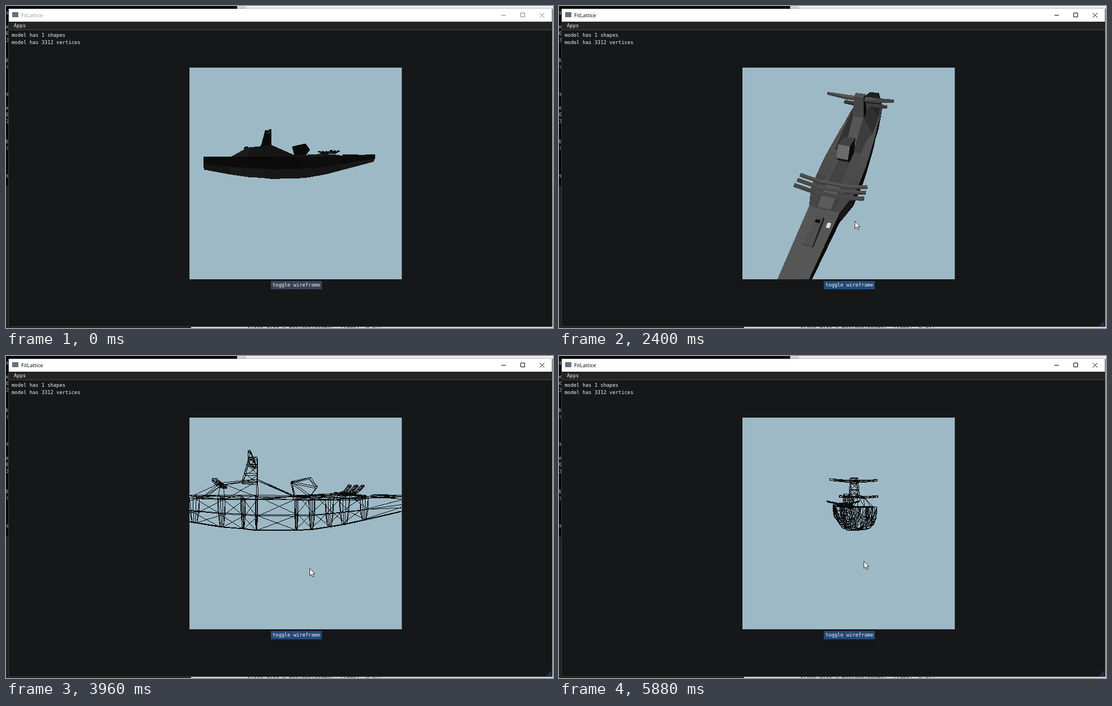
An HTML page with a canvas that plays this animation: 975x575 px, repeating every 6000 ms.

```html
<!DOCTYPE html>
<html lang="en">
<head>
<meta charset="utf-8">
<title>Model viewer</title>
<style>
  html, body { margin: 0; width: 100%; height: 100%; overflow: hidden; background: #fff; }
  #stage { position: absolute; left: 0; top: 0; width: 975px; height: 575px; overflow: hidden; background: #f4f5f5; }
  #stage * { position: absolute; box-sizing: border-box; white-space: pre; }
  .mono { font: 8.86px/13px "DejaVu Sans Mono", "Noto Sans Mono", monospace; color: #f4f4f4; }
  #console { left: 0; top: 0; width: 412px; height: 321px; background: #080808; }
  #side { left: 0; top: 321px; width: 330px; height: 254px; background: #232527; }
  #tab { left: 412px; top: 0; width: 16px; height: 8px; background: #d5d7d8; }
  #code { left: 430px; top: 568px; color: #444; font-size: 9.5px; }
  #win { left: 4px; top: 5px; width: 970px; height: 568px; background: #151718; border: 1px solid #3a3c3e; border-top: 0; box-shadow: 0 0 4px rgba(0, 0, 0, .4); }
  #bar { left: 0; top: 0; width: 968px; height: 23px; background: #fff; }
  #icon { left: 6px; top: 6px; width: 11px; height: 9px; background: #66717c; }
  #name { left: 22px; top: 5px; font: 9.3px/13px "Open Sans", "Noto Sans", sans-serif; color: #000; }
  #menu { left: 0; top: 23px; width: 968px; height: 15px; background: #242424; border-bottom: 1px solid #46474b; }
  #btns { left: 870px; top: 0; }
  #view { left: 327px; top: 110px; border-right: 1px solid #5a676e; }
  #toggle { left: 472px; top: 491px; width: 91px; height: 15px; line-height: 15px; padding-left: 3px; background: #244a78; }
  #grip { left: 957px; top: 557px; border: 5px solid #1c3350; border-left-color: transparent; border-top-color: transparent; }
  .idle #name { color: #999; }
  .idle #btns { opacity: .5; }
  .idle #toggle { background: #3c4256; }
  .idle #pointer, .idle #grip { display: none; }
  .hover #toggle { background: #4296fa; }
</style>
</head>
<body>
<div id="stage" class="idle">
  <div id="console"></div>
  <div id="side"></div>
  <div id="tab"></div>
  <div id="code" class="mono">float diff = max(dot(normal, light), 0.0);</div>
  <div id="win">
    <div id="bar">
      <div id="icon"></div>
      <div id="name">FitLattice</div>
      <svg id="btns" width="98" height="23" fill="none" stroke="#000">
        <path d="M8 11.5h8M42.500 7.500h7v7h-7zM76.500 7.500l8 8m0-8l-8 8"/>
      </svg>
    </div>
    <div id="menu"><span class="mono" style="left:9px;top:1px">Apps</span></div>
    <div class="mono" style="left:5px;top:41px">model has 1 shapes</div>
    <div class="mono" style="left:5px;top:54px">model has 3312 vertices</div>
    <div id="grip"></div>
  </div>
  <canvas id="view" width="378" height="378"></canvas>
  <div id="toggle" class="mono">toggle wireframe</div>
  <svg id="pointer" width="14" height="20" style="left:0;top:0">
    <path d="M.5 .5v13l3-2.800 2 4.700 2.200-.9-2-4.600h4z" fill="#fff" stroke="#000" stroke-width=".8"/>
  </svg>
</div>
<script>
const $ = id => document.getElementById(id);
const stage = $('stage'), pointer = $('pointer');
const SIZE = 378, MID = SIZE / 2, FOCAL = 456, LOOP = 6000, STEP = 120;
const WIRE_FROM = 3240;

// Clipped console column behind the window
[[12, 's'], [37, 'e'], [49, '0'], [61, '3'], [97, 'b'], [109, 't'],
 [157, 's'], [182, 'e'], [194, '0'], [206, '3'], [242, 'b'], [254, 't'], [303, 's']]
  .forEach(([y, ch]) => {
    const el = document.createElement('span');
    el.className = 'mono';
    el.textContent = ch;
    el.style.cssText = `left:0;top:${y - 6}px;color:${ch === 't' ? '#48a5dc' : '#d0d0d0'}`;
    $('console').append(el);
  });

// ---- Model: x forward, y up, z starboard ----
const faces = [], ribs = [];
const addFace = (pts, grey) => faces.push({ pts, grey, tone: .88 + (faces.length * 37 % 25) / 100 });

function loft(rings) {
  for (let k = 1; k < rings.length; k++) {
    const a = rings[k - 1], b = rings[k];
    a.forEach((p, i) => {
      const j = (i + 1) % a.length;
      addFace([p, a[j], b[j], b[i]]);
    });
  }
  addFace(rings[0]);
  addFace(rings[rings.length - 1]);
}

// Cross beam with raised, tapered tips
const bar = (x, y, rise, span, chord, thick, taper) =>
  loft([-1, -.4, .4, 1].map(u => {
    const c = chord * (1 - taper * Math.abs(u)), h = y + rise * Math.abs(u), z = span * u;
    return [[x - c, h - thick, z], [x + c, h - thick, z], [x + c, h + thick, z], [x - c, h + thick, z]];
  }));

const plate = (x0, x1, y, z0, z1, grey) =>
  addFace([[x0, y, z0], [x1, y, z0], [x1, y, z1], [x0, y, z1]], grey);

// x, half width, deck, keel
const hull = [
  [-154, 7, 30, 9], [-114, 19, 30, 1], [-84, 21, 30, -4], [-60, 21, 30, -6], [-45, 22, 30, -8],
  [1, 23, 30, -8], [19, 23, 30, -7], [40, 22, 30, -4], [58, 21, 31, -1], [82, 14, 31, 4], [152, 10, 34, 20]
];
loft(hull.map(([x, w, top, low]) => {
  const mid = low + (top - low) * .45;
  return [[x, top, -w], [x, top, w], [x, mid, w * .95], [x, low, w * .45], [x, low, -w * .45], [x, mid, -w * .95]];
}));

// Superstructure: x, base half width, roof height, roof half width
loft([[-110, 17, 30.5, 14], [-84, 19, 45, 7], [-44, 19, 50, 6], [-2, 17, 32, 5],
      [52, 14, 35, 7], [82, 10, 33, 6]]
  .map(([x, w, y, v]) => [[x, 29, -w], [x, y, -v], [x, y, v], [x, 29, w]]));

// Tower
loft([0, .35, .7, 1].map(u => {
  const x = -61 + 8 * u, y = 46 + 29 * u, w = 6.5 - u;
  return [[x, y, -w], [-44, y, -w], [-44, y, w], [x, y, w]];
}));
bar(-50, 69, 3, 38, 4.5, 1.3, .75);
bar(-86, 43, 2, 28, 4, 1.3, .4);

// Turret
loft([-6, 6].map(z => [[-5, 48, z], [17, 53, z], [25, 42, z], [17, 32, z], [-1, 32, z]]));
[55, 62, 69].forEach(x => bar(x, 33, 7, 32, 1.6, 1, 0));

// Foredeck fittings
loft([[92, 3], [120, 4]].map(([x, w]) => [[x, 31, -w - 1], [x, 34, -w], [x, 34, w], [x, 31, w + 1]]));
plate(96, 99, 34.6, -2, 2, 12);
plate(96, 101, 33.5, -11, -8, 225);

// Inner frames, seen in wireframe only
hull.forEach(([x, w, top, low], i) => {
  const n = i === 0 ? 7 : i < 10 ? 4 : 0;
  for (let k = 0; k < n; k++) {
    const z = w * (2 * k / (n - 1) - 1);
    ribs.push([[x, top, z], [x, low, z * .45]]);
  }
});

// ---- Renderer ----
const ctx = $('view').getContext('2d');
const img = ctx.createImageData(SIZE, SIZE);
const px = new Uint32Array(img.data.buffer);
const zbuf = new Float32Array(SIZE * SIZE);
const rgb = (r, g, b) => (255 << 24 | b << 16 | g << 8 | r) >>> 0;
const SKY = rgb(158, 185, 198), INK = rgb(10, 11, 11);
const LIGHT = [.62, .78, 0];

const dot = (a, b) => a[0] * b[0] + a[1] * b[1] + a[2] * b[2];
const sub = (a, b) => a.map((v, i) => v - b[i]);
const cross = (a, b) => [a[1] * b[2] - a[2] * b[1], a[2] * b[0] - a[0] * b[2], a[0] * b[1] - a[1] * b[0]];
const unit = a => { const l = Math.hypot(...a) || 1; return a.map(v => v / l); };

function tri(a, b, c, col) {
  const area = (b[0] - a[0]) * (c[1] - a[1]) - (b[1] - a[1]) * (c[0] - a[0]);
  if (Math.abs(area) < 1e-6) return;
  const lo = i => Math.max(0, Math.floor(Math.min(a[i], b[i], c[i])));
  const hi = i => Math.min(SIZE - 1, Math.ceil(Math.max(a[i], b[i], c[i])));
  const x0 = lo(0), x1 = hi(0), y1 = hi(1);
  for (let y = lo(1); y <= y1; y++) {
    for (let x = x0; x <= x1; x++) {
      const X = x + .5, Y = y + .5;
      const u = ((X - a[0]) * (c[1] - a[1]) - (Y - a[1]) * (c[0] - a[0])) / area;
      const v = ((b[0] - a[0]) * (Y - a[1]) - (b[1] - a[1]) * (X - a[0])) / area;
      if (u < 0 || v < 0 || u + v > 1) continue;
      const z = a[2] + u * (b[2] - a[2]) + v * (c[2] - a[2]), i = y * SIZE + x;
      if (z > zbuf[i]) { zbuf[i] = z; px[i] = col; }
    }
  }
}

function line(a, b) {
  const dx = b[0] - a[0], dy = b[1] - a[1];
  const n = Math.ceil(Math.max(Math.abs(dx), Math.abs(dy))) || 1;
  for (let i = 0; i <= n; i++) {
    const x = Math.floor(a[0] + dx * i / n), y = Math.floor(a[1] + dy * i / n);
    if (x >= 0 && y >= 0 && x < SIZE && y < SIZE) px[y * SIZE + x] = INK;
  }
}

function shade(face, eye) {
  if (face.grey) return rgb(face.grey, face.grey, face.grey);
  const p = face.pts;
  let n = unit(cross(sub(p[1], p[0]), sub(p[2], p[0])));
  if (dot(n, sub(eye, p[0])) < 0) n = n.map(v => -v);
  const lit = Math.max(0, dot(n, LIGHT));
  // The highlight fades out towards the stern
  const x = p.reduce((sum, q) => sum + q[0], 0) / p.length;
  const fade = Math.min(1, Math.max(0, (x + 150) / 100));
  const shine = fade * Math.max(0, dot(unit(eye), LIGHT));
  const g = Math.round((11 + 22 * lit + 68 * lit * shine + 22 * Math.max(0, -n[1])) * face.tone);
  return rgb(g, g, g);
}

function render([yaw, pitch, dist], wire) {
  const a = yaw * Math.PI / 180, e = pitch * Math.PI / 180;
  const c = Math.cos(a), s = Math.sin(a), ce = Math.cos(e), se = Math.sin(e);
  const out = [c * ce, se, s * ce], right = [s, 0, -c], up = [-c * se, ce, -s * se];
  const eye = out.map(v => v * dist);
  const project = p => {
    const k = 1 / (dist - dot(p, out));
    return [MID + FOCAL * k * dot(p, right), MID - FOCAL * k * dot(p, up), k];
  };
  px.fill(SKY);
  zbuf.fill(0);
  for (const f of faces) {
    const q = f.pts.map(project);
    const col = wire ? 0 : shade(f, eye);
    for (let i = 2; i < q.length; i++) {
      if (wire) {
        line(q[0], q[i - 1]);
        line(q[i - 1], q[i]);
        line(q[i], q[0]);
      } else tri(q[0], q[i - 1], q[i], col);
    }
  }
  if (wire) ribs.forEach(([p, q]) => line(project(p), project(q)));
  ctx.putImageData(img, 0, 0);
}

// ---- Motion ----
// time, yaw, pitch, distance
const camera = [
  [0, 104, 4, 456], [840, 157, 30, 456], [1800, 306, 62, 350], [2520, 353, 39, 290],
  [3240, 353, 39, 290], [3960, 455, 0, 298], [5040, 514, 4, 456], [5880, 550, 4, 456]
];
// time, x, y
const mouse = [
  [0, 452, 268], [840, 481, 292], [1800, 524, 304], [2520, 527, 400], [2880, 529, 498],
  [3240, 529, 498], [3960, 541, 379], [5040, 543, 348], [5880, 543, 366]
];

function at(keys, t) {
  let i = 1;
  while (i < keys.length - 1 && keys[i][0] < t) i++;
  const a = keys[i - 1], b = keys[i];
  const u = Math.min(1, (t - a[0]) / (b[0] - a[0]));
  return a.slice(1).map((v, k) => v + (b[k + 1] - v) * u);
}

const start = performance.now();
let shown = -1;
function tick() {
  const t = Math.floor((performance.now() - start) % LOOP / STEP) * STEP;
  if (t !== shown) {
    shown = t;
    const [x, y] = at(mouse, t);
    const over = x > 472 && x < 563 && y > 491 && y < 506;
    stage.className = t < STEP ? 'idle' : over ? 'hover' : '';
    pointer.style.transform = `translate(${Math.round(x)}px, ${Math.round(y)}px)`;
    render(at(camera, t), t >= WIRE_FROM);
  }
  requestAnimationFrame(tick);
}
tick();
</script>
</body>
</html>
```
